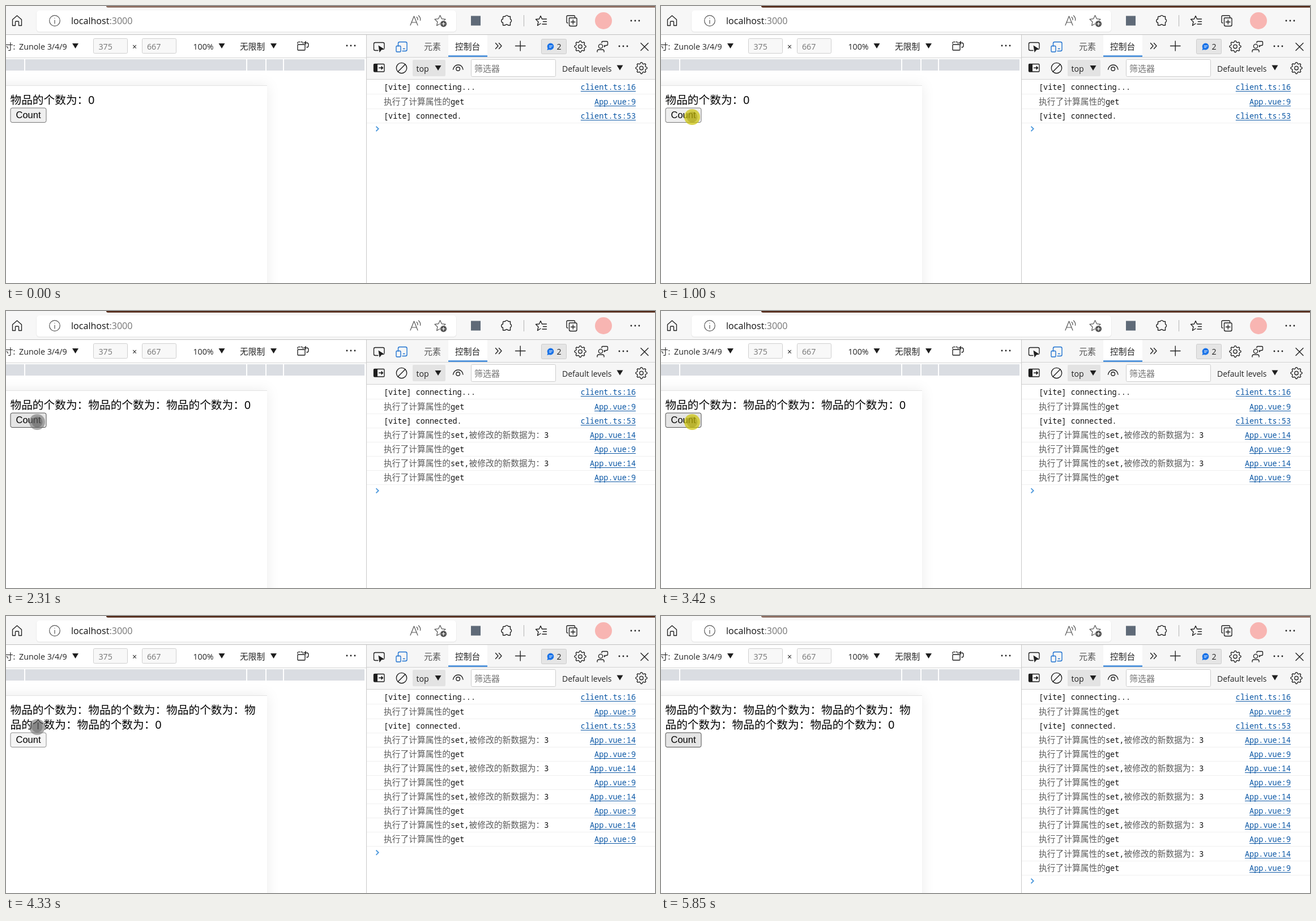
Animation of 1146x489 px, one loop 5950 ms. Source, as an HTML page:

```html
<!DOCTYPE html>
<html lang="zh-CN">
<head>
<meta charset="utf-8">
<title>Computed property demo</title>
<style>
  html, body { margin: 0; width: 100%; height: 100%; overflow: hidden; background: #fff; }
  svg { display: block; width: 100vw; height: 100vh; }
  text { font: 14.2px "Open Sans", "Noto Sans CJK SC", sans-serif; fill: #222; white-space: pre; }
  .grey { fill: #757575; }
  .url { font-size: 16.1px; fill: #111; }
  .page { font: 19.7px "Liberation Sans", "Noto Sans CJK SC", sans-serif; fill: #000; }
  .label { font: 16.5px "Liberation Sans", Arial, sans-serif; fill: #000; }
  .log { font: 13.5px "Noto Sans Mono", monospace; fill: #111; }
  .log .cjk { font: 300 14.75px "Noto Sans CJK SC", sans-serif; fill: #5c5c5c; }
  .link { font: 13.5px "Noto Sans Mono", monospace; fill: #0b57a5; }
  .icon { fill: none; stroke: #1f1f1f; stroke-width: 1.35; stroke-linecap: round; stroke-linejoin: round; }
  .thin { stroke: #555; stroke-width: 1.2; }
  .blue { stroke: #1a6fd0; }
  .solid { fill: #1f1f1f; stroke: none; }
  .box { fill: #f8f8f8; stroke: #cfcfcf; }
  .sheet { fill: #fff; filter: drop-shadow(0 0 11px rgba(0, 0, 0, .08)); }
  .btn rect { fill: #efefef; stroke: #767676; }
  .btn.hover rect { fill: #e5e5e5; stroke: #4f4f4f; }
  .btn.active rect { fill: #f5f5f5; stroke: #8d8d8d; }
  .outer { fill: rgba(110, 110, 110, .58); }
  .inner { fill: rgba(70, 70, 70, .36); }
  .down .outer { fill: rgba(202, 194, 8, .72); }
  .down .inner { fill: rgba(125, 115, 0, .28); }
</style>
</head>
<body>
<svg viewBox="0 0 1146 489" preserveAspectRatio="none">
  <defs>
    <path id="tri" class="solid" d="M-5.5-4.5h11L0 4.5Z"/>
    <g id="dots" class="solid"><circle cx="-7" r="1.4"/><circle r="1.4"/><circle cx="7" r="1.4"/></g>
    <path id="gear"/>
    <path id="star"/>
  </defs>

  <!-- emulated page -->
  <rect class="sheet" x="-60" y="140" width="521" height="420"/>
  <path d="M0 140.5H461" stroke="#e2e2e2"/>
  <text class="page" id="line1" x="7.5" y="172.6"></text>
  <text class="page" id="line2" x="7.5" y="198.7"></text>
  <g class="btn" id="btn">
    <rect x="8" y="180" width="63" height="25.5" rx="3"/>
    <text class="label" x="17.5" y="198">Count</text>
  </g>

  <!-- browser toolbar -->
  <rect width="1146" height="50" fill="#f7f7f7"/>
  <path id="strip" d="M177 0H1146V2.7H180Q177 2.7 177 0Z"/>
  <rect x="53" y="8" width="743" height="39" rx="6" fill="#000" opacity=".04"/>
  <rect x="54" y="8" width="741" height="37" rx="5" fill="#fff"/>
  <path d="M0 50.5H1146" stroke="#bfbfbf"/>
  <path class="icon" d="M11.5 24 19.5 17 27.5 24V34.5H22.5V28Q22.5 27 21.5 27H17.5Q16.5 27 16.5 28V34.5H11.5Z"/>
  <g class="icon thin"><circle cx="86" cy="26" r="9.3"/><path d="M86 25V31M86 21.4V21.6"/></g>
  <text class="url" x="115" y="32">localhost<tspan class="grey">:3000</tspan></text>
  <path class="icon thin" d="M714 34 720.5 18 727 34M716.3 29H724.7M725 19.5Q727.5 21.5 727 24.5M728.5 17Q732.5 20.5 731.5 25.5"/>
  <use href="#star" class="icon thin" x="766.5" y="26.5"/>
  <circle cx="772.5" cy="31.5" r="6" fill="#555" stroke="#fff"/>
  <path d="M769.5 31.5H775.5M772.5 28.5V34.5" stroke="#fff" stroke-width="1.2"/>
  <rect x="821" y="17.5" width="17" height="17" fill="#5f6a78"/>
  <path class="icon" d="M879 18.5H881.5A3 3 0 0 1 887 18.5H890.5V23A3.2 3.2 0 0 1 890.5 29V34H886.5A2.8 2.8 0 0 0 881.5 34H877.5V29.5A3.3 3.3 0 0 1 877.5 23V20Q877.5 18.5 879 18.5Z"/>
  <path d="M914.5 16V36" stroke="#b5b5b5"/>
  <path class="icon" d="M944 31 938.5 34.5 940 28 935.5 23.5 941.5 23 944 17.5 946.5 23H954.5M948.5 27.5H954.5M947 32H954.5"/>
  <path class="icon" d="M1004.5 20V18.5Q1004.5 17 1003 17H992Q990 17 990 19V28Q990 30 992 30M995 21H1006Q1008 21 1008 23V33Q1008 35.5 1005.5 35.5H997Q994.5 35.5 994.5 33V21.5ZM1001.3 24.5V32M997.5 28.2H1005"/>
  <circle cx="1055" cy="26" r="15" fill="#f8b5b2"/>
  <use href="#dots" x="1111" y="26"/>

  <!-- device toolbar -->
  <text x="-16" y="76.5" style="font-size:14.3px">尺寸: </text>
  <text x="23" y="76.5" style="font-size:14.3px">Zunole 3/4/9</text>
  <use href="#tri" x="122.5" y="70.5"/>
  <rect class="box" x="154.5" y="57.5" width="60" height="26" rx="2"/>
  <text class="grey" x="163.5" y="76.5">375</text>
  <text x="223" y="77">×</text>
  <rect class="box" x="240.5" y="57.5" width="60" height="26" rx="2"/>
  <text class="grey" x="249" y="76.5">667</text>
  <text x="330.5" y="76.5">100%</text>
  <use href="#tri" x="381" y="70.5"/>
  <text x="413" y="76.5" style="font-size:14.7px">无限制</text>
  <use href="#tri" x="472.5" y="70.5"/>
  <g class="icon">
    <rect x="515" y="68" width="13" height="10" rx="1"/>
    <path d="M515 66V63.5H524.5V66" stroke-dasharray="2 2.2"/>
    <path d="M527.5 65H531Q534 65 534 68V70Q534 73 531 73M529.5 62.5 527 65 529.5 67.5"/>
  </g>
  <use href="#dots" x="609" y="70"/>
  <path d="M0 91.5H636" stroke="#d4d4d4"/>
  <path d="M0 94H32V114H0ZM34 94H424V114H34ZM426 94H458V114H426ZM460 94H489V114H460ZM491 94H633V114H491Z" fill="#dadde2"/>

  <!-- developer tools -->
  <rect x="636" y="51" width="510" height="78" fill="#f6f6f6"/>
  <rect x="781" y="51" width="69" height="39" fill="#fff"/>
  <path d="M637 90.5H1146M637 129.5H1146" stroke="#d2d2d2"/>
  <path d="M781 88.5H850" stroke="#0f6cd0" stroke-width="2"/>
  <path d="M636.5 51V489" stroke="#c9c9c9"/>
  <path class="icon" d="M657 78.5H652Q649.5 78.5 649.5 76V67Q649.5 64.5 652 64.5H665.5Q668 64.5 668 67V75"/>
  <path class="solid" d="M657.5 69.5 668.5 76.5 663 77.5 659.5 82Z"/>
  <g class="icon blue">
    <path d="M692.5 71V66Q692.5 63.5 695 63.5H705.5Q708 63.5 708 66V77Q708 79.5 705.5 79.5H700M701.5 75.5H704"/>
    <rect x="689" y="70.5" width="8" height="10.5" rx="1.5"/>
  </g>
  <text x="738" y="76.5" style="font-size:15px;fill:#555">元素</text>
  <text x="793" y="76.5" style="font-size:14.7px">控制台</text>
  <path class="icon" d="M864.5 65.5 869 70.5 864.5 75.5M870.5 65.5 875 70.5 870.5 75.5M899.5 70.5H917M908.2 62V79"/>
  <rect x="945.5" y="58.5" width="44" height="26" rx="2" fill="#e5e5e5" stroke="#cdcdcd"/>
  <path d="M961.5 65.5a6 6 0 1 1-2.5 11.5l-3.5 1 1-3.5a6 6 0 0 1 5-9Z" fill="#1a73e8"/>
  <path d="M959 70.5H965M959 73H963" stroke="#fff"/>
  <text x="972.5" y="76.5">2</text>
  <g class="icon">
    <use href="#gear" x="1014" y="71.5"/><circle cx="1014" cy="71.5" r="3.2"/>
    <circle cx="1050" cy="71" r="3.6"/>
    <path d="M1044 81Q1043.5 77 1047 77H1053Q1056.5 77 1056 81M1052 65V64Q1052 62.5 1053.5 62.5H1061Q1062.5 62.5 1062.5 64V68Q1062.5 69.5 1061 69.5H1059L1056.5 72V69.5"/>
    <path d="M1121 65.5 1134 78.5M1134 65.5 1121 78.5"/>
  </g>
  <use href="#dots" x="1090" y="71"/>
  <rect class="icon" x="649.5" y="102.5" width="18.5" height="13.5" rx="1.5"/>
  <path class="solid" d="M649.5 102.5H656V116H649.5ZM662.5 105.5 666.5 109.2 662.5 113Z"/>
  <path class="icon" d="M658.5 109.2H664"/>
  <g class="icon"><circle cx="698.5" cy="109.5" r="9.2"/><path d="M692 116 705 103"/></g>
  <rect x="718" y="95" width="58" height="29" rx="2" fill="#e3e3e3"/>
  <text x="724.5" y="115.5">top</text>
  <use href="#tri" x="763" y="109.5"/>
  <g class="icon"><path d="M789.5 112Q791.5 104 798.5 104T807 112"/><circle cx="798.2" cy="111" r="3.3"/></g>
  <rect x="821.5" y="94.5" width="149" height="30" rx="2" fill="#fff" stroke="#cdcdcd"/>
  <text class="grey" x="827" y="115.5" style="font-size:15px">筛选器</text>
  <text x="982" y="115.5" style="font-size:14px">Default levels</text>
  <use href="#tri" x="1084" y="109"/>
  <g class="icon"><use href="#gear" x="1122" y="109.5"/><circle cx="1122" cy="109.5" r="3.2"/></g>
  <g id="console"></g>
  <path id="prompt" d="M653.5 212.7 657.7 216.8 653.5 221" fill="none" stroke="#4a97dc" stroke-width="1.8"/>

  <g id="cursor"><circle class="outer" r="14"/><circle class="inner" r="9.5"/></g>
</svg>
<script>
  const LOOP = 5950, PITCH = 25.1;
  const PRESSES = [1000, 2010, 3420, 4230, 4830];
  const TAPS = [1100, 2110, 3520, 4330, 4930];
  const PATH = [
    [100, 668, 23], [200, 560, 43], [300, 400, 86], [400, 245, 136], [490, 130, 176],
    [590, 75, 198], [690, 57, 203], [790, 55, 196], [5130, 92, 184], [5230, 330, 112],
    [5350, 655, 34], [5450, 716, 15]
  ];
  const $ = id => document.getElementById(id);

  // closed outline from polar points
  function ring(count, point) {
    const pts = Array.from({ length: count }, (_, i) => {
      const [r, a] = point(i);
      return (r * Math.cos(a)).toFixed(2) + ' ' + (r * Math.sin(a)).toFixed(2);
    });
    return 'M' + pts.join('L') + 'Z';
  }
  $('star').setAttribute('d', ring(10, i => [i % 2 ? 4.8 : 10, (i / 5 - .5) * Math.PI]));
  $('gear').setAttribute('d', ring(32, i => [i % 4 < 2 ? 10 : 7.8, (i - .5) * Math.PI / 16]));

  function logRow(i) {
    const get = ['执行了计算属性的get', 'App.vue:9'];
    const set = ['执行了计算属性的set,被修改的新数据为：3', 'App.vue:14'];
    const first = [['[vite] connecting...', 'client.ts:16'], get, ['[vite] connected.', 'client.ts:53']];
    const [msg, link] = first[i] || (i % 2 ? set : get);
    const y = Math.round(148.4 + PITCH * i);
    const rich = msg.replace(/[^\x00-\x7f]+/g, '<tspan class="cjk">$&</tspan>');
    const left = 1112 - link.length * 8.1;
    return `<g><text class="log" x="667" y="${y}">${rich}</text>
      <text class="link" x="1112" y="${y}" text-anchor="end">${link}</text>
      <path d="M${left} ${y + 2.5}H1112" stroke="#0b57a5"/>
      <path d="M637 ${y + 7.5}H1146" stroke="#f0f0f0"/></g>`;
  }
  $('console').innerHTML = Array.from({ length: 13 }, (_, i) => logRow(i)).join('');
  const rows = [...$('console').children];

  function buttonState(t, taps) {
    if (!taps) return 'btn';
    return t < TAPS[taps - 1] + 200 ? 'btn active' : 'btn hover';
  }

  function draw(t) {
    const taps = TAPS.filter(s => t >= s).length;
    const text = '物品的个数为：'.repeat(taps + 1) + '0';
    const wrap = taps >= 3;
    $('line1').textContent = wrap ? text.slice(0, 22) : text;
    $('line2').textContent = wrap ? text.slice(22) : '';
    $('btn').setAttribute('class', buttonState(t, taps));
    $('btn').setAttribute('transform', `translate(0 ${wrap ? 26 : 0})`);

    rows.forEach((row, i) => row.style.display = i < 3 + taps * 2 ? '' : 'none');
    $('prompt').setAttribute('transform', `translate(0 ${taps * PITCH * 2})`);
    $('strip').setAttribute('fill', t >= 1000 && t < 5850 ? '#532a19' : '#8c6c5f');

    const spot = PATH.filter(p => t >= p[0]).pop();
    const cursor = $('cursor');
    cursor.style.display = spot && t < 5550 ? '' : 'none';
    if (spot) cursor.setAttribute('transform', `translate(${spot[1]} ${spot[2]})`);
    cursor.setAttribute('class', PRESSES.some((s, i) => t >= s && t < TAPS[i]) ? 'down' : '');
  }

  function tick() {
    draw(performance.now() % LOOP);
    requestAnimationFrame(tick);
  }
  tick();
</script>
</body>
</html>
```
